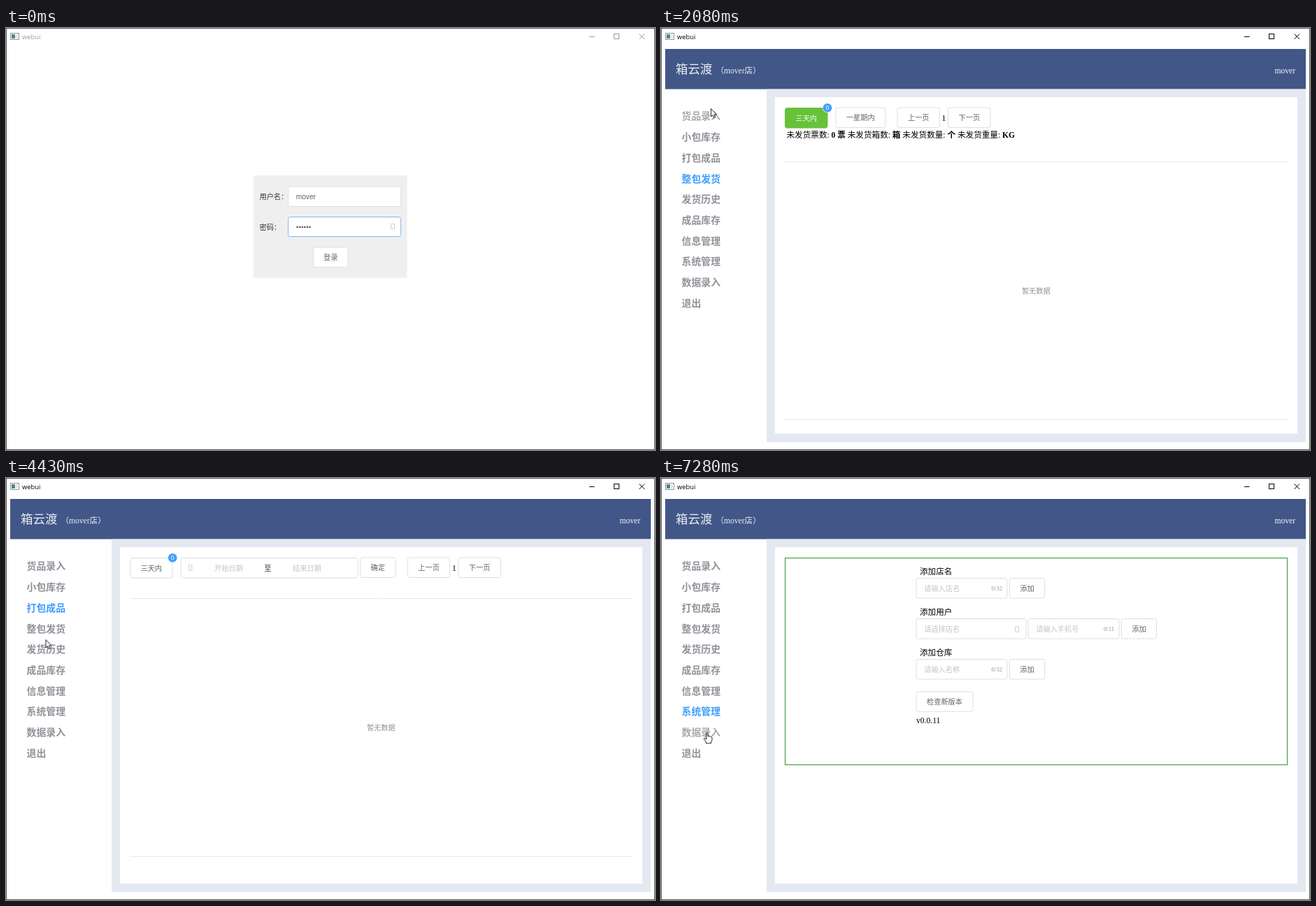
An HTML page with a canvas for the animation above (8000 ms loop, 928 by 604 pixels).

```html
<!DOCTYPE html>
<html lang="zh-CN">
<head>
<meta charset="utf-8">
<title>webui</title>
<style>
html, body { margin: 0; width: 100%; height: 100%; overflow: hidden; background: #fff; }
canvas { display: block; width: 928px; height: 604px; }
</style>
</head>
<body>
<canvas id="stage" width="928" height="604"></canvas>
<script>
const ctx = document.getElementById('stage').getContext('2d');
const LOOP = 8000;
const CJK = '"Noto Sans CJK SC", "Noto Sans CJK", sans-serif';
const SANS = '"Liberation Sans", ' + CJK;
const SERIF = '"Liberation Serif", ' + CJK;
const USER = 'mover';
const C = {
  text: '#606266', dark: '#303133', muted: '#909399', hint: '#c0c4cc',
  border: '#dcdfe6', line: '#e4e8f0', blue: '#409eff', green: '#67c23a', red: '#f56c6c'
};
const NAV = ['货品录入', '小包库存', '打包成品', '整包发货', '发货历史',
  '成品库存', '信息管理', '系统管理', '数据录入', '退出'];
const navY = i => 126.3 + i * 29.7;

// [start, page index in NAV]
const VISITS = [[1180, 3], [2760, 0], [3430, 1], [4040, 2], [4960, 4], [5890, 5], [6120, 6], [6930, 7]];
const LOADED = 1430;

// [time, x, y] of the pointer tip
const PATH = [
  [20, 640, 590], [450, 520, 310], [820, 467, 328], [1500, 467, 328],
  [1700, 140, 151], [1840, 95, 128], [2080, 71, 115], [2140, 71, 115],
  [2420, 66, 124], [2760, 66, 124], [3010, 67, 160], [3430, 67, 160],
  [3640, 66, 163], [3800, 66, 163], [3850, 62, 186], [4040, 62, 186],
  [4300, 58, 205], [4430, 56.5, 231], [4480, 56.5, 231], [4670, 58, 243],
  [4960, 58, 243], [5100, 60, 246], [5440, 55, 385], [5749, 55, 385],
  [5750, 64, 281], [5890, 64, 281], [6110, 64, 305], [6280, 64, 335],
  [6550, 64, 338], [6930, 64, 338], [7070, 65, 342], [7280, 66, 364], [8000, 66, 364]
];

function pointer(t) {
  const i = PATH.findIndex(p => p[0] > t);
  if (i < 1) return null;
  const [t0, x0, y0] = PATH[i - 1], [t1, x1, y1] = PATH[i];
  const k = (t - t0) / (t1 - t0);
  return { x: x0 + (x1 - x0) * k, y: y0 + (y1 - y0) * k };
}

// Draws text centred on y and returns its right end.
function text(s, x, y, size, color, { font = SANS, bold = false, align = 'left' } = {}) {
  ctx.font = (bold ? 'bold ' : '') + size + 'px ' + font;
  ctx.textAlign = align;
  ctx.fillStyle = color;
  ctx.fillText(s, x, y + size * 0.37);
  return x + ctx.measureText(s).width;
}

function fill(x, y, w, h, color) {
  ctx.fillStyle = color;
  ctx.fillRect(x, y, w, h);
}

function stroke(color, pts, width = 1) {
  ctx.strokeStyle = color;
  ctx.lineWidth = width;
  ctx.beginPath();
  pts.forEach(([x, y], i) => i ? ctx.lineTo(x, y) : ctx.moveTo(x, y));
  ctx.stroke();
}

function box(x, y, w, h, bg = '#fff', edge = C.border) {
  ctx.beginPath();
  ctx.roundRect(x, y, w, h, 2.9);
  ctx.fillStyle = bg;
  ctx.fill();
  ctx.strokeStyle = edge;
  ctx.lineWidth = 1;
  ctx.stroke();
}

function button(s, x, y, w, bg = '#fff', color = C.text, edge = bg === '#fff' ? C.border : bg, h = 28.5, size = 10.2) {
  box(x, y, w, h, bg, edge);
  text(s, x + w / 2, y + h / 2 + 0.2, size, color, { align: 'center' });
}

function input(hint, x, y, w, color = C.hint, edge = C.border) {
  box(x, y, w, 28.5, '#fff', edge);
  text(hint, x + 11.2, y + 14.4, 10.2, color);
}

function glyphBox(x, y, color) {
  ctx.strokeStyle = color;
  ctx.lineWidth = 0.8;
  ctx.strokeRect(x - 2.2, y - 3.7, 4.6, 7.4);
}

function badge(x) {
  ctx.beginPath();
  ctx.arc(x, 114.3, 6.9, 0, 7);
  ctx.fillStyle = '#fff';
  ctx.fill();
  ctx.beginPath();
  ctx.arc(x, 114.3, 6.3, 0, 7);
  ctx.fillStyle = C.blue;
  ctx.fill();
  text('0', x, 114, 8.7, '#fff', { align: 'center' });
}

const rule = (y, to = 896) => stroke(C.line, [[177, y], [to, y]]);
const label = (s, x, y) => text(s, x, y, 11.6, '#000', { font: SERIF });
const head = (s, x, y) => text(s, x, y, 10.2, C.muted, { font: SERIF, bold: true });
const empty = y => text('暂无数据', 536.3, y, 10.2, C.muted, { align: 'center' });

function pager(x, y) {
  button('上一页', x, y, 60.5);
  label('1', x + 63.6, y + 14.5);
  button('下一页', x + 72.6, y, 60.5);
}

function dateRange(x) {
  box(x, 114.5, 253, 28.5);
  glyphBox(x + 13.5, 128.5, C.hint);
  text('开始日期', x + 48, 128.8, 10.2, C.hint);
  text('至', x + 119.3, 128.8, 10.2, C.dark);
  text('结束日期', x + 160, 128.8, 10.2, C.hint);
}

// Parts alternate between regular and bold.
function stats(parts, y) {
  let x = 179.5;
  parts.forEach((s, i) => {
    x = text(s + ' ', x, y, 11.6, '#000', { font: SERIF, bold: i % 2 === 1 });
  });
}

function search(x, y) {
  input('请输入名称关键字、UPC编码', x, y, 165);
  box(x + 165, y, 52, 28.5, '#f5f7fa');
  text('搜索', x + 191, y + 14.4, 10.2, C.muted, { align: 'center' });
  pager(x + 231.5, y);
}

function goodsPage() {
  search(192, 125.5);
  stroke('#a3d5df', [[187, 166.3], [625, 166.3]], 1.5);
  head('名称', 184.5, 184);
  head('UPC', 642, 184);
  head('操作', 757.5, 184);
  [201.5, 219.5, 311.5, 418.5].forEach(y => rule(y));
  label('添加 UPC', 177, 320);
  head('名称', 184.5, 343.3);
  head('UPC', 402, 343.3);
  head('金额', 532, 343.3);
  head('操作', 604, 343.3);
  rule(361.5, 706);
  box(192, 370.5, 202.5, 38.5);
  text('货品名称', 203, 381, 10.2, C.hint);
  stroke('#777', [[387, 407.5], [393, 401.5]], 0.8);
  stroke('#777', [[390.5, 407.5], [393, 405]], 0.8);
  input('UPC 编码', 402, 375.5, 115.5);
  input('0', 532, 375.5, 58, C.text);
  button('删除', 604.5, 379.5, 40.5, C.red, '#fff', C.red, 20.5, 8.7);
  button('添加', 655.5, 379.5, 40, '#fff', C.text, C.border, 20.5, 8.7);
  button('保存', 511.5, 424.5, 50);
}

function stockPage() {
  search(177.5, 114.5);
  rule(172.5);
  empty(357);
}

function packPage() {
  button('三天内', 177.5, 114.5, 60.5);
  badge(238.2);
  dateRange(250);
  button('确定', 506.5, 114, 50.5);
  pager(574.3, 114);
  rule(172.5);
  rule(541.5);
  empty(357);
}

function shipPage(t) {
  const busy = t < LOADED, dx = busy ? 11.8 : 0, dy = busy ? 1 : 0;
  const bg = busy ? '#9bd77c' : C.green;
  box(177.5, 114.5 + dy / 2, 60.5 + dx, 28.5, bg, bg);
  if (busy) glyphBox(196, 129, '#fff');
  text('三天内', 192.5 + dx, 128.8, 10.2, '#fff');
  badge(238 + dx);
  button('一星期内', 249.8 + dx, 114, 71);
  pager(338 + dx, 114);
  stats(['未发货票数:', '0 票', '未发货箱数:', busy ? '0 箱' : '箱',
    '未发货数量:', '个', '未发货重量:', 'KG'], 153 + dy);
  rule(191.5 + dy);
  rule(560.5 + dy / 2);
  empty(376);
}

function historyPage() {
  button('一星期内', 177.5, 114, 70.5, C.green, '#fff');
  dateRange(260.3);
  input('QZK、物流编号', 516.5, 114, 108);
  button('确定', 639.5, 114, 50.5);
  pager(707.3, 114);
  stats(['已发货票数:', '0 票', '已发货箱数:', '箱', '已发货数量:', '个',
    '已发货重量:', 'KG', '已发货金额:'], 153);
  rule(191.5);
  rule(560.5);
  empty(376);
}

function systemPage() {
  ctx.strokeStyle = '#2e962e';
  ctx.lineWidth = 1;
  ctx.strokeRect(177.5, 114.5, 718, 296);
  const count = (s, x, y) => text(s, x, y, 8.7, C.muted, { font: SERIF, align: 'right' });
  const row = (title, hint, y) => {
    label(title, 370, y - 10);
    input(hint, 365, y, 130);
    count('0/32', 488, y + 14.2);
    button('添加', 498.3, y, 50.3);
  };
  row('添加店名', '请输入店名', 143.5);
  label('添加用户', 370, 191.5);
  input('请选择店名', 365, 201.5, 157);
  glyphBox(509, 216.5, C.hint);
  input('请输入手机号', 525, 201.5, 130);
  count('0/11', 648, 215.7);
  button('添加', 658.3, 201.5, 50.3);
  row('添加仓库', '请输入名称', 259.5);
  button('检查新版本', 365, 305.8, 81);
  label('v0.0.11', 365, 347);
}

const PAGES = [goodsPage, stockPage, packPage, shipPage, historyPage, stockPage, stockPage, systemPage];

function loginPage(over) {
  fill(354, 211, 219.5, 146.5, '#efefef');
  text('用户名：', 362.5, 241, 10.2, C.dark);
  text('密码：', 362.5, 284.8, 10.2, C.dark);
  input(USER, 403.5, 227, 161, C.text);
  box(403.5, 270.5, 161, 28, '#fff', '#7fb9f7');
  for (let i = 0; i < 6; i++) fill(415.3 + i * 3.6, 283.7, 2.4, 2.4, C.text);
  glyphBox(553, 284, C.hint);
  if (over) button('登录', 439.5, 314, 49.5, '#ecf5ff', C.blue, '#c6e2ff');
  else button('登录', 439.5, 314, 49.5);
}

function frame(active) {
  fill(0, 0, 928, 604, '#fff');
  const ink = active ? '#000' : '#999';
  ctx.strokeStyle = '#8a9494';
  ctx.lineWidth = 1;
  ctx.strokeRect(6.5, 7.5, 12, 9);
  fill(8, 9, 5, 6, '#4f8580');
  fill(14, 9, 3, 6, '#dfe6e6');
  text('webui', 23, 12.3, 9.4, ink, { font: '"Open Sans", sans-serif' });
  stroke(ink, [[834, 12.5], [841.5, 12.5]]);
  ctx.strokeStyle = ink;
  ctx.strokeRect(869.5, 8.5, 7, 7);
  stroke(ink, [[905.5, 8.5], [913, 16]]);
  stroke(ink, [[913, 8.5], [905.5, 16]]);
}

function shell(current, hover) {
  fill(6, 30, 916, 57.5, '#425787');
  text('箱云渡', 21, 59, 17.5, '#e9edf4');
  text('（' + USER + '店）', 78.4, 60.8, 11.6, '#e9edf4', { font: SERIF });
  text(USER, 907, 60.8, 11.6, '#f4f6fa', { font: SERIF, align: 'right' });
  fill(151, 87.5, 771, 505, '#e4e8f1');
  fill(163, 99, 747, 481.5, '#fff');
  NAV.forEach((s, i) => {
    const color = i === current ? C.blue : i === hover ? '#a6a9ad' : C.muted;
    text(s, 29.5, navY(i), 13.9, color, { bold: true });
  });
}

function shape(x, y, path) {
  ctx.save();
  ctx.translate(x, y);
  const p = new Path2D(path);
  ctx.fillStyle = '#fff';
  ctx.fill(p);
  ctx.strokeStyle = '#111';
  ctx.lineWidth = 0.9;
  ctx.lineJoin = 'round';
  ctx.stroke(p);
  ctx.restore();
}

const ARROW = 'M.5 .5V12L3 9.6L4.8 13.6L6.6 12.8L4.9 8.9H8.4Z';
const HAND = 'M-1 1.2Q0 -.5 1 1.2V5.5Q2.4 4.7 3 6Q4.4 5.2 5 6.6Q6.6 5.8 7 7.6V11L5.6 14V15.8H-1.5V14L-4.6 9.6Q-4.8 7.8 -3 8.5L-1 10Z';

function draw(t) {
  const p = pointer(t);
  frame(t >= 860);
  const visit = VISITS.filter(v => v[0] <= t).pop();
  let hand = false;
  if (visit) {
    const near = d => p.x < 90 ? NAV.findIndex((s, i) => Math.abs(p.y - navY(i)) < d) : -1;
    hand = near(9) >= 0;
    shell(visit[1], near(12));
    PAGES[visit[1]](t);
  } else {
    hand = !!p && Math.abs(p.x - 464) < 25 && Math.abs(p.y - 328) < 14;
    loginPage(hand);
  }
  if (p) shape(p.x, p.y, hand ? HAND : ARROW);
  ctx.strokeStyle = '#5a5a58';
  ctx.lineWidth = 1;
  ctx.strokeRect(0.5, 0.5, 927, 603);
}

function tick(now) {
  draw(now % LOOP);
  requestAnimationFrame(tick);
}
draw(0);
requestAnimationFrame(tick);
</script>
</body>
</html>
```
